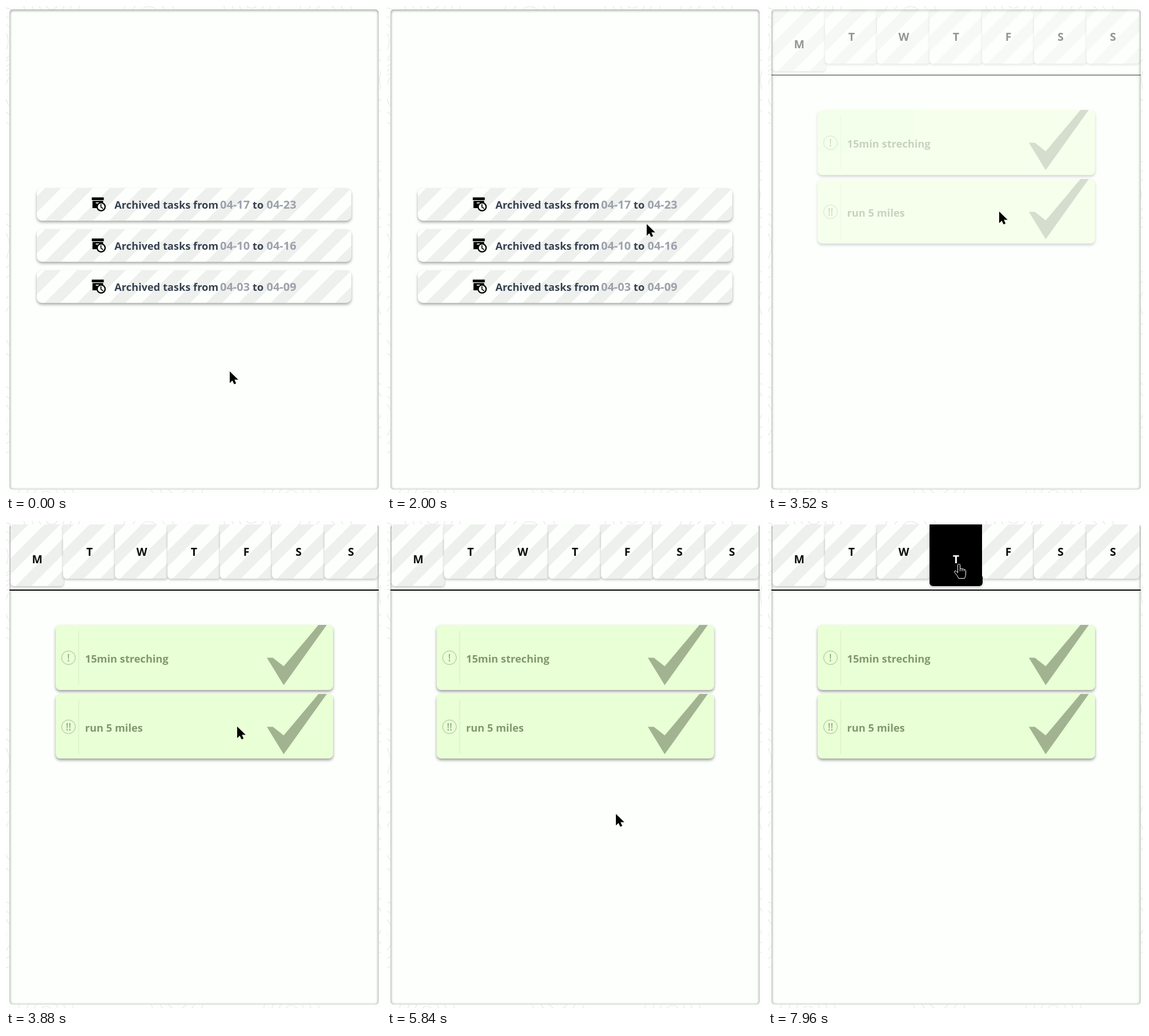
Write an HTML page that moves like this. It is 657 px wide and 853 px high and loops after 8000 ms.

```html
<!DOCTYPE html>
<html lang="en">
<head>
<meta charset="utf-8">
<title>Task archive</title>
<style>
  html, body { margin: 0; width: 100%; height: 100%; overflow: hidden; }
  body {
    position: relative;
    background: #fdfffd;
    font: 700 18.25px "Open Sans", "Noto Sans", sans-serif;
    --loop: 8s infinite;
    --stripes: repeating-linear-gradient(-45deg,
      rgba(0,0,0,.058) 0 20px, transparent 20px 40px);
  }
  body > *, .card *, .task * { position: absolute; }
  .contours { left: 0; top: 0; fill: none; stroke: #e6e8e6; stroke-width: 1.2; }

  .panel {
    left: 6px; top: 6px; width: 647px; height: 841px;
    border-radius: 6px;
    background: #fdfffd;
    box-shadow: inset 0 1px 4px 1px rgba(0,0,0,.36);
  }

  /* Week list */
  .weeks { inset: 0; animation: leave var(--loop) linear; }
  .card {
    --hot: 0;
    position: absolute; left: 54px; width: 551px; height: 57px;
    border-radius: 9px;
    line-height: 57px; white-space: nowrap; color: #374151;
    --fill: color-mix(in srgb, #9ba2af calc(var(--hot) * 100%), #fdfffd);
    background: var(--stripes) var(--fill);
    box-shadow: 0 3px 5px rgba(0,0,0,calc(.33 - .17 * var(--hot)));
  }
  .card span { top: 0; }
  .card svg { left: 93.7px; top: 13.8px; }
  .card .slot { fill: var(--fill); }
  .card .clock { fill: var(--fill); stroke: #000; stroke-width: 2; }
  .card b {
    top: -.5px; font-size: 20px;
    color: color-mix(in srgb, #949ba8 calc(var(--hot) * 100%), #9ca1ab);
  }
  .card:nth-child(1) { top: 319px; animation: hot1 var(--loop) step-end; }
  .card:nth-child(2) { top: 391px; animation: hot2 var(--loop) step-end; }
  .card:nth-child(3) { top: 463px; animation: hot3 var(--loop) step-end; }

  /* Week view */
  .week { inset: 0; animation: enter var(--loop) linear; }
  .tabs {
    position: absolute; left: 6px; top: 6px; width: 647px; height: 114px;
    border-bottom: 2px solid #000;
    overflow: hidden;
  }
  .tab {
    position: absolute; top: 0; height: 95px; width: 93px;
    left: calc(2.2px + 91.6px * var(--i));
    border-radius: 0 0 6px 6px;
    background: var(--stripes) #fdfffd;
    box-shadow: 0 2px 4px rgba(0,0,0,.24);
    color: #0b0b0b; font-size: 19.5px;
  }
  .tab span { position: absolute; bottom: 0; width: 100%; text-align: center; line-height: 95px; }
  .tab:nth-child(1) { height: 108px; }
  .tab:nth-child(4) { animation: pick var(--loop) linear; }

  .task {
    position: absolute; left: 87px; width: 485.5px; height: 113.5px;
    border-radius: 8px;
    background: #e9ffd5;
    box-shadow: 0 3px 5px rgba(0,0,0,.38);
    line-height: 117px; white-space: nowrap; color: #81976d;
  }
  .task:nth-of-type(2) { top: 182px; }
  .task:nth-of-type(3) { top: 302.5px; }
  .task span { left: 51.5px; top: 0; }
  .task i {
    left: 10px; top: 45px; width: 23px; height: 23px;
    border: 1px solid #a4b992; border-radius: 50%;
    font: 500 18px/22px "Open Sans", "Noto Sans", sans-serif;
    text-align: center;
  }
  .task hr { left: 40px; top: 10px; margin: 0; width: 1px; height: 95px; border: 0; background: #d6ebc2; }
  .task svg { left: 0; top: 0; fill: #a1b391; }

  /* Pointer */
  .cursor { left: 0; top: 0; overflow: visible; animation: move var(--loop) steps(2); }
  .arrow { animation: arrow var(--loop) step-end; }
  .hand { stroke: #000; opacity: 0; animation: hand var(--loop) step-end; }

  @keyframes leave { 0%, 36.5% { opacity: 1; } 39%, 100% { opacity: 0; } }
  @keyframes enter { 0%, 42.5% { opacity: 0; } 46%, 100% { opacity: 1; } }
  @keyframes hot1 { 0% { --hot: 0; } 25.5%, 100% { --hot: 1; } }
  @keyframes hot2 { 0%, 25%, 100% { --hot: 0; } 24% { --hot: 1; } }
  @keyframes hot3 { 0%, 23.5%, 100% { --hot: 0; } 22.5% { --hot: 1; } }
  @keyframes pick {
    0%, 97.4% { height: 95px; background-color: #fdfffd; color: #0b0b0b; }
    99.3%, 100% { height: 108px; background-color: #000; color: #fff; }
  }
  @keyframes arrow {
    0%, 23.5%, 25%, 39% { opacity: 1; }
    22.5%, 24%, 25.5%, 97.4%, 100% { opacity: 0; }
  }
  @keyframes hand {
    0%, 23.5%, 25%, 39% { opacity: 0; stroke: #000; }
    22.5%, 24%, 25.5% { opacity: 1; stroke: #000; }
    97.4%, 100% { opacity: 1; stroke: #fff; }
  }
  @keyframes move {
    0%, 17% { transform: translate(392px, 640px); }
    18% { transform: translate(400px, 634px); }
    19% { transform: translate(428px, 613px); }
    20% { transform: translate(460px, 585px); }
    21% { transform: translate(487px, 552px); }
    22% { transform: translate(497px, 518px); }
    23% { transform: translate(493px, 474px); }
    24% { transform: translate(478px, 425px); }
    25% { transform: translate(455px, 382px); }
    26% { transform: translate(428px, 366px); }
    27% { transform: translate(410px, 362px); }
    28% { transform: translate(405px, 360px); }
    61% { transform: translate(405px, 360px); animation-timing-function: ease-in-out; }
    68%, 71.5% { transform: translate(400px, 512px); }
    73% { transform: translate(401px, 513px); }
    92.5% { transform: translate(401px, 513px); animation-timing-function: cubic-bezier(.4, 0, .8, .8); }
    97.3% { transform: translate(340px, 102px); animation-timing-function: ease-out; }
    99.5%, 100% { transform: translate(335px, 75px); }
  }
</style>
</head>
<body>
<svg class="contours" width="657" height="853">
  <defs>
    <g id="rings">
      <ellipse rx="14" ry="20"/><ellipse rx="24" ry="33"/>
      <ellipse rx="36" ry="45"/><ellipse rx="50" ry="60"/>
    </g>
  </defs>
  <use href="#rings" x="-10" y="62"/>
  <use href="#rings" x="22" y="150"/>
  <use href="#rings" x="-18" y="420"/>
  <use href="#rings" x="30" y="560"/>
  <use href="#rings" x="-14" y="725"/>
  <use href="#rings" x="80" y="-14"/>
  <use href="#rings" x="250" y="34"/>
  <use href="#rings" x="430" y="-16"/>
  <use href="#rings" x="560" y="30"/>
  <use href="#rings" x="678" y="130"/>
  <use href="#rings" x="640" y="330"/>
  <use href="#rings" x="676" y="520"/>
  <use href="#rings" x="636" y="700"/>
  <use href="#rings" x="70" y="870"/>
  <use href="#rings" x="300" y="822"/>
  <use href="#rings" x="500" y="868"/>
</svg>

<div class="panel"></div>
<main class="weeks"></main>
<section class="week"></section>

<svg class="cursor" width="1" height="1">
  <path class="arrow" d="M0 0V20.2L4.6 16 7.7 22.6 11.2 21 8.2 14.6H14.8Z"/>
  <g class="hand" stroke-linejoin="round">
    <path d="M-2.5 1.5Q-.5 -.8 1.5 1.5V8.5Q3.6 7.3 5 9Q7 8 8.4 10Q10.6 9.3 11.5 11.5V18Q11.5 21 9.5 25.5H-1Q-2.5 21 -8.5 14.5Q-8.5 11.8 -6 12.3L-2.5 15.5Z"/>
    <path d="M1.5 8.5V13M5 9V13M8.4 10V13" fill="none"/>
  </g>
</svg>

<script>
  const $ = (selector) => document.querySelector(selector);

  const icon = `<svg width="28" height="28" viewBox="0 0 24 24">
    <path d="M2 2H20V6H2ZM3 7H19V18H3Z"/>
    <path class="slot" d="M8 9.5H13V11H8Z"/>
    <circle class="clock" cx="16" cy="16" r="6"/>
    <path d="M15 12H16.5V16.2L19.4 17.9 18.6 19.2 15 17Z"/>
  </svg>`;

  const card = ([from, to]) => `<div class="card">${icon}
    <span style="left:136px">Archived tasks from</span><b style="left:321px">${from}</b>
    <span style="left:378px">to</span><b style="left:402.5px">${to}</b></div>`;

  const tab = (letter, i) => `<div class="tab" style="--i:${i}"><span>${letter}</span></div>`;

  const task = ([mark, text]) => `<div class="task"><i>${mark}</i><hr><span>${text}</span>
    <svg width="486" height="114"><path d="M370 57.5H380.5L399.5 72.5Q428 39 460.5 0H475L399.5 105.5Z"/></svg></div>`;

  $('.weeks').innerHTML =
    [['04-17', '04-23'], ['04-10', '04-16'], ['04-03', '04-09']].map(card).join('');
  $('.week').innerHTML =
    `<div class="tabs">${[...'MTWTFSS'].map(tab).join('')}</div>` +
    [['!', '15min streching'], ['!!', 'run 5 miles']].map(task).join('');
</script>
</body>
</html>
```
